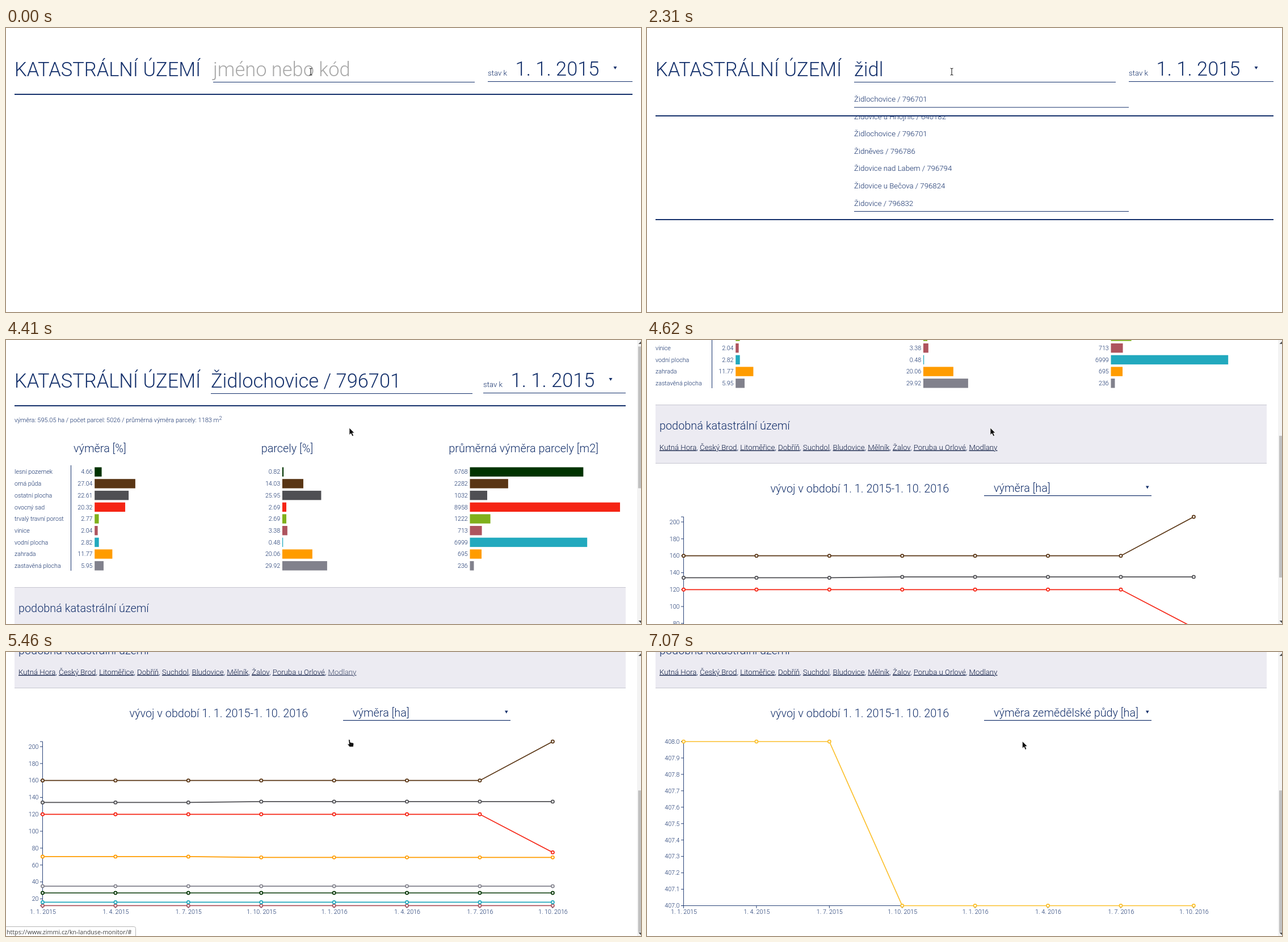
An HTML page that plays this animation: 1119 px wide and 501 px high, repeating every 8 s.

```html
<!DOCTYPE html>
<html lang="cs">
<head>
<meta charset="utf-8">
<title>Katastrální území</title>
<style>
html, body { margin: 0; width: 100%; height: 100%; overflow: hidden; background: #fff; }
svg { display: block; font-family: Roboto, sans-serif; font-weight: 300; }
</style>
</head>
<body>
<svg id="stage" width="1119" height="501" viewBox="0 0 1119 501"></svg>
<script>
const LOOP = 8000, STEP = 70;
const INK = '#14306b';
const BIG = 34.45, MID = 19.85, LIST = 13.23, SMALL = 10.7;

const clamp = u => Math.min(1, Math.max(0, u));
const ramp = (t, a, b) => clamp((t - a) / (b - a));
const smooth = u => u * u * (3 - 2 * u);
const within = (t, a, b) => t >= a && t < b;
const repeat = (v, n) => Array(n).fill(v);

const text = (x, y, s, size, attrs = '') =>
  `<text x="${x}" y="${y}" font-size="${size}" fill="${INK}" ${attrs}>${s}</text>`;
const rect = (x, y, w, h, fill = INK, attrs = '') =>
  `<rect x="${x}" y="${y}" width="${w}" height="${h}" fill="${fill}" ${attrs}/>`;
const path = (d, attrs = `fill="${INK}"`) => `<path d="${d}" ${attrs}/>`;
const group = (attrs, s) => `<g ${attrs}>${s}</g>`;
const END = 'text-anchor="end"', MIDDLE = 'text-anchor="middle"';

// land use: name, colour, area share, parcel share, mean parcel area
const uses = [
  ['lesní pozemek', '#003300', '4.66', '0.82', 6768],
  ['orná půda', '#593514', '27.04', '14.03', 2282],
  ['ostatní plocha', '#4f4f53', '22.61', '25.95', 1032],
  ['ovocný sad', '#f52414', '20.32', '2.69', 8958],
  ['trvalý travní porost', '#80b01c', '2.77', '2.69', 1222],
  ['vinice', '#ae545e', '2.04', '3.38', 713],
  ['vodní plocha', '#22a9be', '2.82', '0.48', 6999],
  ['zahrada', '#ff9c00', '11.77', '20.06', 695],
  ['zastavěná plocha', '#81818c', '5.95', '29.92', 236],
];
const columns = [
  { title: 'výměra [%]', x: 119, scale: 2.65 },
  { title: 'parcely [%]', x: 449.7, scale: 2.64 },
  { title: 'průměrná výměra parcely [m2]', x: 780.3, scale: .02953 },
];
const similar = ['Kutná Hora', 'Český Brod', 'Litoměřice', 'Dobříň', 'Suchdol',
  'Bludovice', 'Mělník', 'Žalov', 'Poruba u Orlové', 'Modlany'];
const dates = ['1. 1. 2015', '1. 4. 2015', '1. 7. 2015', '1. 10. 2015',
  '1. 1. 2016', '1. 4. 2016', '1. 7. 2016', '1. 10. 2016'];
const areaSeries = [
  [uses[0][1], repeat(27, 8)],
  [uses[1][1], [...repeat(160, 7), 206]],
  [uses[2][1], [...repeat(134, 3), ...repeat(135, 5)]],
  [uses[3][1], [...repeat(120, 7), 75]],
  [uses[5][1], repeat(12, 8)],
  [uses[6][1], repeat(16, 8)],
  [uses[7][1], [...repeat(70, 3), ...repeat(69, 5)]],
  [uses[8][1], repeat(35, 8)],
];
const farmSeries = [['#fbc02d', [...repeat(408, 3), ...repeat(407, 5)]]];
const measures = ['výměra [ha]', 'výměra zemědělské půdy [ha]', 'výměra [%]', 'počet parcel',
  'parcely [%]', 'průměrná výměra parcely [m2]', 'výměra orné půdy [ha]', 'výměra lesní půdy [ha]'];

const match = 'Židlochovice / 796701';
const twoLetters = ['Židenice / 611115', 'Židovice u Hnojnic / 640182', 'Žibřidice / 796620',
  'Židlochovice / 796701', 'Židněves / 796786', 'Židovice nad Labem / 796794',
  'Židovice u Bečova / 796824', 'Židovice / 796832', 'Žihle / 796921', 'Žihobce / 796972',
  'Žichlínek / 797006', 'Žichovice / 797014', 'Žilina / 797103'];
const threeLetters = twoLetters.filter(s => s.startsWith('Žid'));

const items = (list, x) =>
  list.map((s, i) => text(x, 130 + 30.6 * i, s, LIST)).join('');
const rule = (y, right = 1104) => rect(15, y, right - 15, 2);

function suggestions(t) {
  if (within(t, 1260, 1400)) return items(twoLetters, 361);
  if (!within(t, 1400, 3430)) return rule(116, t < 3430 ? 1104 : 1092);
  const full = items(threeLetters, 365) + rect(365, 323, 484, 1) + rule(337);
  if (t < 1680) return full;
  // the lower part of the longer list stays behind
  return '<clipPath id="rest"><path d="M0 156H1119V501H0z"/></clipPath>' +
    group('clip-path="url(#rest)"', full) +
    items([match], 365) + rect(365, 139.5, 484, 1) + rule(154);
}

function header(t, narrow) {
  const x = narrow ? 361 : 365, right = narrow ? 841 : 849;
  const typed = [[980, 'ž', 17], [1120, 'ži', 25], [1400, 'žid', 43.5], [1610, 'židl', 51.3]]
    .filter(k => t >= k[0]).pop();
  let s = text(15, 84.6, 'KATASTRÁLNÍ ÚZEMÍ', BIG);
  if (t >= 3430) s += text(x, 84.6, match, BIG);
  else if (typed) s += text(x, 84.6, typed[1], BIG);
  else s += text(x, 84.6, 'jméno nebo kód', BIG, 'style="fill:#a9a9a9"');
  if (within(t, 210, 840) || within(t, 980, 2310) || within(t, 2870, 3430))
    s += rect(x + (typed ? typed[2] : 0), 48, 1, 46, '#222');
  return s + rect(x, 95, 461, 1) +
    text(right, 84, 'stav k', LIST) + text(right + 48.6, 84.4, '1. 1. 2015', BIG) +
    path(`M${right + 221.5} 68h6l-3 5z`) +
    rect(right, 94, (narrow ? 1092 : 1104) - right, 1);
}

function bars() {
  let s = text(15, 145.7, 'výměra: 595.05 ha / počet parcel: 5026 / průměrná výměra parcely: 1183 m' +
    '<tspan dy="-3.6" font-size="9">2</tspan>', 11) + rect(114, 222, 1, 186);
  columns.forEach(c => s += text(c.x, 199, c.title, MID));
  uses.forEach(([name, color, ...values], i) => {
    const y = 233.7 + 20.7 * i;
    s += text(15, y + 3.7, name, SMALL);
    columns.forEach((c, k) => {
      s += text(c.x + 33.5, y + 3.7, values[k], SMALL, END) +
        rect(c.x + 37.2, y - 8.2, values[k] * c.scale, 16.4, color);
    });
  });
  return s;
}

function similarAreas(hover) {
  const links = similar.map((name, i) =>
    `<tspan text-decoration="underline" fill="#0e1d44" fill-opacity="${i == 9 ? 1 - .25 * hover : 1}">${name}</tspan>`);
  return rect(15, 437, 1077, 104, '#ecebf2') + rect(15, 437, 1077, 1, '#c6c6d0') +
    rect(15, 540, 1077, 1, '#c6c6d0') +
    text(22, 480.7, 'podobná katastrální území', MID) + text(22, 516.5, links.join(', '), LIST);
}

function chart(farm) {
  const x = i => 64.5 + 128.41 * i;
  const y = farm ? v => 924.5 - 289.5 * (v - 407) : v => 942.3 - 1.4917 * v;
  const ticks = farm ? Array.from({ length: 11 }, (_, i) => (407 + i / 10).toFixed(1))
    : Array.from({ length: 10 }, (_, i) => 20 * (i + 1));
  let s = path('M60 635H64.5V924.5H963.4V929M64.5 924.5H60', `fill="none" stroke="${INK}" stroke-width=".9"`);
  ticks.forEach(v => s += rect(60, y(v) - .45, 4.5, .9) + text(57.5, y(v) + 3.8, v, SMALL, END));
  dates.forEach((d, i) => s += rect(x(i) - .45, 924.5, .9, 4.5) + text(x(i) + .5, 939, d, SMALL, MIDDLE));
  (farm ? farmSeries : areaSeries).forEach(([color, values]) => {
    const points = values.map((v, i) => [x(i), y(v)]);
    s += group(`stroke="${color}" stroke-width="1.7" fill="#fff"`,
      path('M' + points.join('L'), 'fill="none"') +
      points.map(p => `<circle cx="${p[0]}" cy="${p[1]}" r="2.6"/>`).join(''));
  });
  return s;
}

function history(farm) {
  return text(217.5, 591.5, 'vývoj v období 1. 1. 2015-1. 10. 2016', MID) +
    text(611, 590.5, measures[farm ? 1 : 0], MID) +
    path('M879 580.5h5.6l-2.8 5z') + rect(594, 597, 295, 1.2) + chart(farm);
}

function scrollbar(t, scroll) {
  return rect(1112, 0, 7, 501, '#f3f3f3') +
    rect(1114, 11 + scroll * .489, 5, t < 3430 ? 330 : 250, '#c1c1c1') +
    path('M1114.5 7L1119 2.5V7zM1114.5 495H1119V499.5z', 'fill="#505050"');
}

function statusBar() {
  return path('M-1 484.5H225.5Q228.5 484.5 228.5 487.5V502H-1z', 'fill="#fff" stroke="#b6b6b6"') +
    text(1, 498, 'https://www.zimmi.cz/kn-landuse-monitor/#', SMALL,
      'style="font-family:\'Open Sans\',sans-serif;font-weight:400;fill:#444"');
}

function dropdown(active) {
  return rect(594, 120, 296, 197, '#fff', 'stroke="#a9a9a9"') +
    rect(595, 121 + 24.4 * active, 294, 24.4, '#c8c8c8') +
    measures.map((m, i) => text(611, 140 + 24.4 * i, m, MID)).join('');
}

const track = [[0, 537, 77], [2310, 537, 77], [3080, 473, 121], [3640, 473, 121], [4130, 604.6, 154.4],
  [5600, 604.6, 154.4], [6160, 648, 108], [6510, 648, 108], [6860, 661, 157], [LOOP, 661, 157]];
const shapes = {
  beam: path('M-2.5 -6Q0 -6 0 -4.5Q0 -6 2.5 -6M0 -5V5M-2.5 6Q0 6 0 4.5Q0 6 2.5 6',
    'fill="none" stroke="#222" stroke-width="1.1"'),
  arrow: path('M.3 .3V13.2L3.3 10.5L5.5 15.4L8 14.3L5.8 9.6H9.6z',
    'fill="#111" stroke="#fff" stroke-width=".9"'),
  hand: path('M-1 .5Q.5 -1.2 1.6 .6L2.4 5L7 5.8Q8.6 6.4 8.3 8.6L7.4 13H.8L-2.8 8.4Q-2.6 6.8 -.2 8z',
    'fill="#111" stroke="#fff" stroke-width=".9"'),
};

function cursor(t) {
  const i = track.findIndex(p => p[0] > t), a = track[i - 1], b = track[i];
  const u = smooth(ramp(t, a[0], b[0]));
  const x = a[1] + (b[1] - a[1]) * u, y = a[2] + (b[2] - a[2]) * u;
  const shape = t < 3430 && y < 96 ? 'beam' : within(t, 4830, 5670) ? 'hand' : 'arrow';
  return group(`transform="translate(${x} ${y})"`, shapes[shape]);
}

function draw(t) {
  const loaded = t >= 3430;
  const narrow = loaded || within(t, 1260, 1400);
  const scroll = Math.round(356 * smooth(ramp(t, 4401, 4671)) + 121 * smooth(ramp(t, 5110, 5400)));
  const hover = ramp(t, 4760, 5110) - ramp(t, 5600, 5950);
  const opacity = .5 - Math.cos(Math.PI * ramp(t, 3430, 3850)) / 2;

  let s = header(t, narrow) + suggestions(t);
  if (loaded) s += group(`opacity="${opacity}"`, bars() + similarAreas(hover) + history(t >= 7070));
  s = group(`transform="translate(0 ${-scroll})"`, s);
  if (narrow) s += scrollbar(t, scroll);
  if (within(t, 4830, 5670)) s += statusBar();
  if (within(t, 6300, 7070)) s += dropdown(t < 6720 ? 0 : 1);
  return s + cursor(t);
}

const stage = document.getElementById('stage');
let shown = -1;
function tick() {
  const t = Math.floor(performance.now() % LOOP / STEP) * STEP;
  if (t !== shown) stage.innerHTML = draw(shown = t);
  requestAnimationFrame(tick);
}
tick();
</script>
</body>
</html>
```
